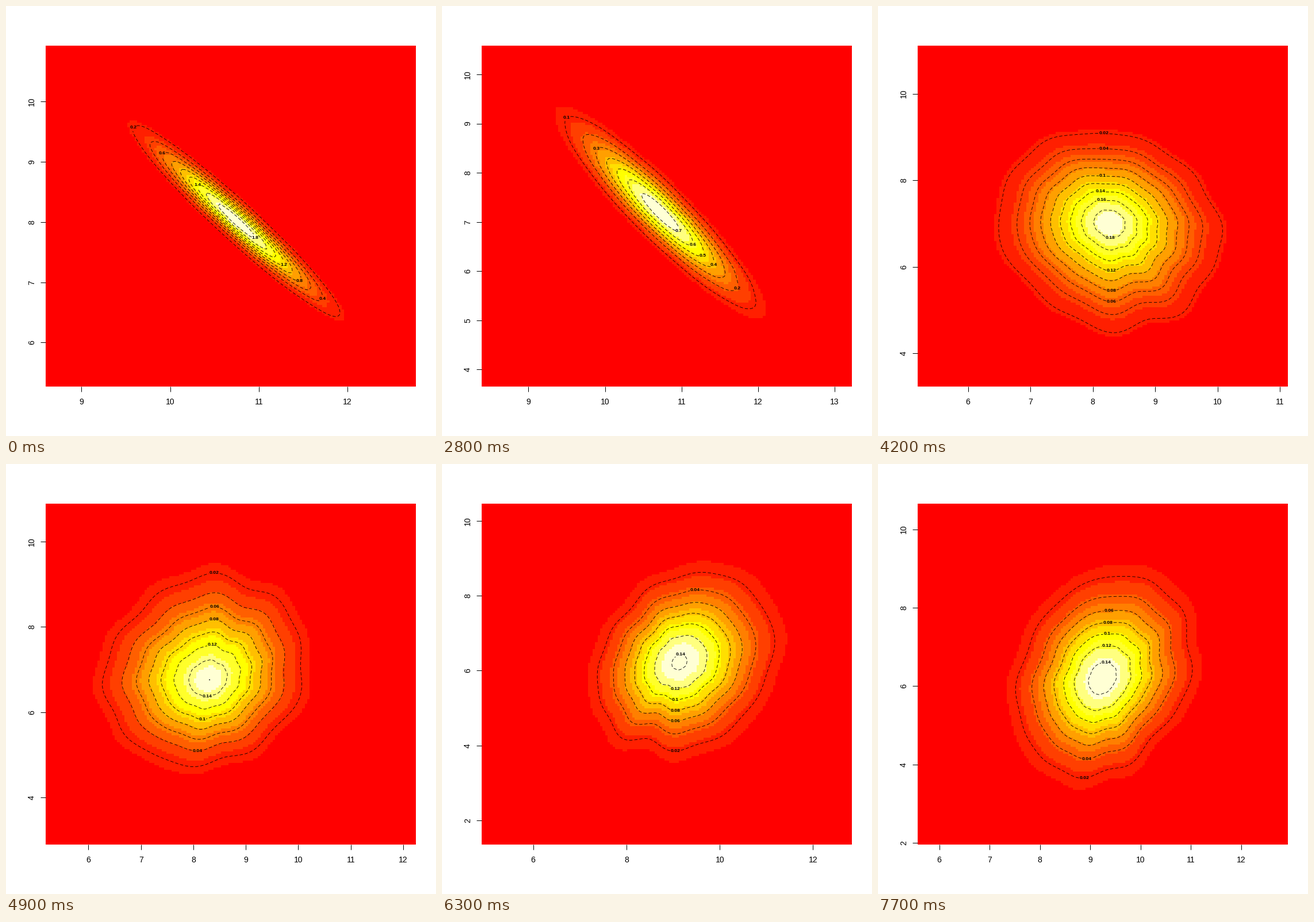
Write a matplotlib script that moves like this. It is 748 px wide and 748 px high and loops after 8 s.

```python
import numpy as np
import matplotlib.pyplot as plt
from matplotlib.animation import ArtistAnimation
from matplotlib.colors import ListedColormap, hsv_to_rgb

SIZE, DPI = 748, 100
PX = 72 / DPI
LEFT, RIGHT, TOP, BOTTOM = 69, 713, 69, 662
CELLS = 150
FONT = "Liberation Sans"

# Twelve heat colours: red to yellow, then fading to cream
HEAT = ListedColormap(
    [hsv_to_rgb((h, 1, 1)) for h in np.linspace(0, 1 / 6, 9)]
    + [hsv_to_rgb((1 / 6, s, 1)) for s in (5 / 6, 1 / 2, 1 / 6)])


def state(center, lim, peak, axes, angle, sides, lean=(0, 0), cusp=6):
    """A density hill in pixels: sigmas along its axes, tilt in degrees.

    lean stretches the hill towards one side, a low cusp sharpens the top;
    sides tells, per contour, if its label sits at the top (t) or bottom (b).
    """
    return dict(center=center, lim=lim, peak=peak, axes=axes, angle=angle,
                sides=sides, lean=lean, cusp=cusp)


def mix(a, b, f):
    return {k: b[k] if k == "sides"
            else np.array(a[k]) * (1 - f) + np.array(b[k]) * f for k in a}


A = state((401, 374), (8.595, 12.772, 5.27, 10.925), 1.95,
          (114, 15.5), 42.5, "tbtb-bt-b")
B = state((383, 357), (8.39, 13.155, 4.76, 11.195), 1.255,
          (119, 16.5), 42.4, "bttbbtbtbttt")
C = state((380, 359), (8.388, 13.225, 3.655, 10.584), .76,
          (115, 23), 45, "tbtbbbb")
D = state((403, 377), (5.193, 11.129, 3.235, 11.11), .2015,
          (91, 77), 22, "ttbbtbttb", lean=(-.01, .07), cusp=1.6)
E = state((353, 376), (5.184, 12.241, 2.895, 10.89), .161,
          (86, 77), 150, "tbttbtb", lean=(-.05, -.1), cusp=1.8)
F = state((412, 345), (4.897, 12.832, 1.355, 10.46), .143,
          (84, 69), 135, "btbbbbt", lean=(.08, 0))
G = state((390, 374), (5.571, 12.93, 1.956, 10.653), .148,
          (91, 70), 118, "bbttttt", lean=(.01, -.04))

STEPS = [A, mix(A, B, 1.2), B, mix(B, C, .7), C, mix(D, E, .3),
         D, E, mix(E, F, .75), F, mix(F, G, .5), G]

dx, dy = (RIGHT - LEFT) / CELLS, (BOTTOM - TOP) / CELLS
X, Y = np.meshgrid(LEFT + dx * (np.arange(CELLS) + .5),
                   TOP + dy * (np.arange(CELLS) + .5))


def density(s, seed):
    rng = np.random.default_rng(seed)
    a = np.radians(s["angle"])
    x, y = X - s["center"][0], Y - s["center"][1]
    long, short = s["axes"]
    u = (x * np.cos(a) + y * np.sin(a)) / long
    v = (y * np.cos(a) - x * np.sin(a)) / short
    r, theta = np.hypot(u, v), np.arctan2(v, u)
    stretch = 1 + (s["lean"][0] * x + s["lean"][1] * y) / np.hypot(x, y)
    # ragged outline, calmer on narrow hills
    for m in range(3, 13):
        phase, twist = rng.uniform(0, 2 * np.pi), rng.uniform(-1, 1)
        stretch += .011 * short / long * np.cos(m * theta + phase + twist * r)
    # t is the distance from the peak in standard deviations
    ts = np.linspace(0, 8, 800)
    t = np.interp(r / stretch, ts * np.tanh(s["cusp"] * ts), ts)
    return s["peak"] * np.exp(-t ** 2 / 2)


def level_step(top):
    c = top / 10
    base = 10 ** np.floor(np.log10(c))
    c /= base
    return base * (10 if c > 7 else 5 if c > 2.8 else 2 if c > 1.4 else 1)


def ticks(lo, hi):
    step = 2 if hi - lo > 7.78 else 1
    return np.arange(np.ceil(lo / step) * step, hi, step)


fig = plt.figure(figsize=(SIZE / DPI, SIZE / DPI), dpi=DPI, facecolor="white")
ax = fig.add_axes((0, 0, 1, 1))
ax.set(xlim=(0, SIZE), ylim=(SIZE, 0))
ax.axis("off")


def tick(xs, ys):
    return ax.plot(xs, ys, color="black", lw=PX, solid_capstyle="butt")[0]


def label(x, y, value, rotation=0):
    return ax.text(x, y, f"{value:g}", family=FONT, size=14 * PX, ha="center",
                   va="baseline", rotation=rotation, rotation_mode="anchor")


def draw_axes(lim):
    x0, x1, y0, y1 = lim
    out = []
    for v in ticks(x0, x1):
        p = LEFT + (v - x0) / (x1 - x0) * (RIGHT - LEFT)
        out += [tick([p, p], [BOTTOM, BOTTOM + 9]), label(p, 693, v)]
    for v in ticks(y0, y1):
        p = BOTTOM - (v - y0) / (y1 - y0) * (BOTTOM - TOP)
        out += [tick([LEFT - 9, LEFT], [p, p]), label(49, p, v, 90)]
    return out


def label_spot(s, side):
    """A far point; the label lands where the contour comes nearest to it."""
    long, short = s["axes"]
    a = np.radians(s["angle"] if long > 2 * short else 90)
    reach = 400 if side == "b" else -400
    return (s["center"][0] + reach * np.cos(a),
            s["center"][1] + reach * np.sin(a))


def draw_contours(z, s):
    out, step = [], level_step(z.max())
    levels = np.arange(step, z.max(), step)
    for lev, side in zip(levels, s["sides"].ljust(len(levels), "-")):
        cs = ax.contour(X, Y, z, levels=[lev], colors="black",
                        linewidths=.85 * PX, linestyles=[(0, (6.5, 4))])
        out.append(cs)
        if side != "-":
            cs.clabel(fmt="%g", fontsize=8.5 * PX, inline_spacing=0,
                      manual=[label_spot(s, side)])
            for t in cs.labelTexts:
                t.set(family=FONT, weight="bold", rotation=0)
                out.append(t)
    return out


def draw(s, seed):
    z = density(s, seed)
    image = ax.imshow(z, extent=(LEFT, RIGHT, BOTTOM, TOP), cmap=HEAT, vmin=0,
                      vmax=z.max(), interpolation="nearest", aspect="auto")
    return [image] + draw_axes(s["lim"]) + draw_contours(z, s)


scenes = [draw(s, i) for i, s in enumerate(STEPS)]

# 80 ticks of 100 ms; each scene holds for seven
anim = ArtistAnimation(fig, [scenes[i // 7] for i in range(80)],
                       interval=100, repeat=True)
plt.show()
```
